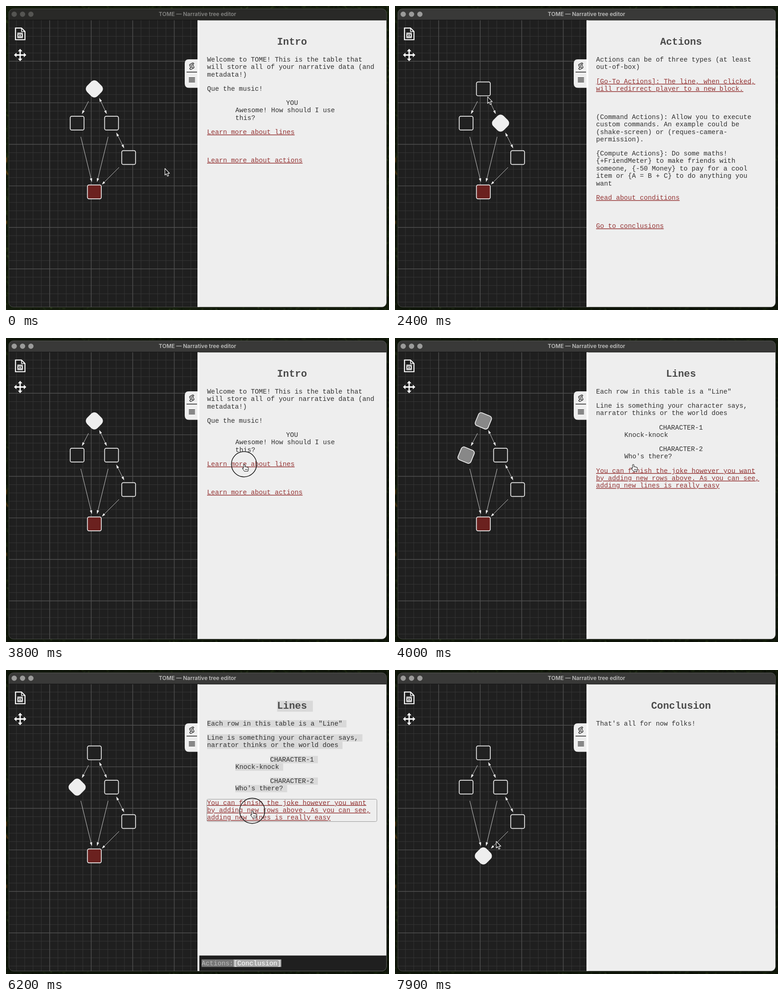
An HTML page that plays this animation: 840 px wide and 667 px high, repeating every 8 s.

```html
<!DOCTYPE html>
<html lang="en">
<head>
<meta charset="utf-8">
<title>Narrative tree editor</title>
<style>
  html, body { margin: 0; width: 100%; height: 100%; overflow: hidden; background: #141c0d; }
  svg { display: block; width: 840px; height: 667px; }
  .mono { font: 14.56px "Liberation Mono", "Courier New", monospace; fill: #303030; white-space: pre; }
  .head { font-size: 21.85px; font-weight: bold; fill: #4a4a4a; text-anchor: middle; }
  .link { fill: #943434; text-decoration: underline; text-decoration-thickness: 1px; text-underline-offset: 1px; }
  .title { font: 600 12px Inter, "Liberation Sans", sans-serif; text-anchor: middle; }
</style>
</head>
<body>
<svg id="stage" viewBox="0 0 840 667" xmlns="http://www.w3.org/2000/svg">
  <defs>
    <clipPath id="frame"><rect x="6" y="6" width="828.5" height="654.5" rx="10"/></clipPath>
    <filter id="soft" filterUnits="userSpaceOnUse" x="0" y="0" width="840" height="667"><feGaussianBlur stdDeviation="1"/></filter>
    <marker id="tip" viewBox="0 0 8 6" refX="7" refY="3" markerWidth="8" markerHeight="6"
      markerUnits="userSpaceOnUse" orient="auto-start-reverse"><path d="M0 0.3 8 3 0 5.7z" fill="#eee"/></marker>
  </defs>
  <rect width="840" height="667" fill="#141c0d"/>
  <g id="grass" fill="none" filter="url(#soft)"></g>
  <rect id="shade" width="840" height="667" fill="#000" opacity="0"/>
  <g clip-path="url(#frame)">
    <rect id="bar" x="6" y="6" width="829" height="25"/>
    <g id="lights"><circle cx="18" cy="18" r="5.8"/><circle cx="36.3" cy="18" r="5.8"/><circle cx="54.6" cy="18" r="5.8"/></g>
    <text id="title" class="title" x="420" y="22">TOME — Narrative tree editor</text>
    <rect x="6" y="31" width="414" height="630" fill="#1f1f1f"/>
    <path id="minor" stroke="#363636"/>
    <path id="major" stroke="#505050" stroke-width="1.4"/>
    <path d="M6 30.8H835" stroke="#111"/>
    <rect x="420" y="31.5" width="415" height="630" fill="#eee"/>
    <rect x="420" y="31.5" width="4" height="630" fill="#fff"/>
    <g fill="none" stroke="#fff" stroke-width="2.2">
      <path d="M20.8 48.3H34L41.600 56V74H20.8z"/>
      <path d="M34 48.5V56H41.5" stroke-width="1.6"/>
      <rect x="25" y="58.5" width="12" height="12" fill="#fff" stroke="none"/>
      <path d="M26.500 60.500H37M26.500 68.700H37" stroke="#1f1f1f" stroke-width="1.300" stroke-dasharray="1.300 1.500"/>
      <path d="M27 64.600H35" stroke="#1f1f1f" stroke-width="4"/>
      <path d="M28.500 64.600H33.500" stroke-width="1.800"/>
    </g>
    <g id="move" transform="translate(31 107.5)" fill="#fff"></g>
    <path d="M420 117H401Q392 117 392 126V170Q392 179.5 401 179.5H420z" fill="#eee"/>
    <path d="M396 145H419" stroke="#222" stroke-width="1.6"/>
    <path d="M401 157.5H414.5M401 160.5H414.5M401 163.5H414.5M401 166.5H414.5" stroke="#222" stroke-width="1.3"/>
    <g transform="translate(407.500 132) rotate(-28)" fill="none" stroke="#222" stroke-width="1.200" stroke-linejoin="round" stroke-linecap="round">
      <path d="M-3.500 2V-3.500Q-3.500-5.500-1.500-5.500H5Q6.500-5.500 6.500-3.500V-2.500H3.500V3.500Q3.500 5.500 1.500 5.500H-5Q-6.500 5.500-6.500 3.500V2H0V3.500Q0 5.500 1.500 5.500"/>
      <path d="M3.500-2.500V-4M-1.500-2.800H1.500M-1.500-.300H1.500"/>
    </g>
    <g id="edges" stroke="#ddd" stroke-width=".9"></g>
    <g id="nodes" stroke="#eee" stroke-width="1.7"></g>
    <g id="page"></g>
  </g>
  <rect x="6.2" y="6.2" width="828.3" height="654.3" rx="10" fill="none" stroke="#777" stroke-width=".7" opacity=".75"/>
  <g id="ring" fill="none"><circle r="28.7" stroke="#fff" stroke-opacity=".25"/><circle r="27.7" stroke="#111" stroke-width="1.5"/></g>
  <path id="arrow" d="M0 0V14.5L3.3 11.5 5.7 17 8.2 15.9 5.9 10.6H10.3z" fill="#151515" stroke="#fff" stroke-width="1.1" stroke-linejoin="round"/>
  <g id="hand" fill="#fff" stroke="#222" stroke-width="1.1" stroke-linejoin="round">
    <path d="M-1 9V1.5Q.5-1 2 1.5V6Q3.500 4.300 4.700 6.200 6.200 5 7.200 6.900 9.200 6 9.700 8.500V11.500L8.300 15.500H1.200L-3.500 9.500Q-3.500 7-1 9z"/>
    <path d="M3 10V13M5 10V13M7 10V13" stroke-width=".9"/>
  </g>
</svg>
<script>
const LOOP = 8000, STEP = 100, CHAR = 8.736, LEFT = 441, MID = 627.3;
const $ = id => document.getElementById(id);
const show = (id, on) => $(id).style.display = on ? '' : 'none';
const clamp = v => Math.max(0, Math.min(1, v));
const ease = v => v * v * (3 - 2 * v);

// Row: [centre y, text, kind]; kinds are a = link, c = character, d = dialogue.
const pages = {
  Intro: [
    [118, 'Welcome to TOME! This is the table that'],
    [134.4, 'will store all of your narrative data (and'],
    [150.8, 'metadata!)'],
    [182, 'Que the music!'],
    [213, 'YOU', 'c'],
    [229.4, 'Awesome! How should I use', 'd'],
    [245.8, 'this?', 'd'],
    [277, 'Learn more about lines', 'a'],
    [339, 'Learn more about actions', 'a']
  ],
  Actions: [
    [118, 'Actions can be of three types (at least'],
    [134.4, 'out-of-box)'],
    [165.7, '[Go-To Actions]: The line, when clicked,', 'a'],
    [182, 'will redirrect player to a new block.', 'a'],
    [244, '(Command Actions): Allow you to execute'],
    [260.4, 'custom commands. An example could be'],
    [276.8, '(shake-screen) or (reques-camera-'],
    [293, 'permission).'],
    [324, '{Compute Actions}: Do some maths!'],
    [340.4, '{+FriendMeter} to make friends with'],
    [356.8, 'someone, {-50 Money} to pay for a cool'],
    [373.2, 'item or {A = B + C} to do anything you'],
    [389.6, 'want'],
    [421, 'Read about conditions', 'a'],
    [483, 'Go to conclusions', 'a']
  ],
  Lines: [
    [118, 'Each row in this table is a "Line"'],
    [149, 'Line is something your character says,'],
    [165.4, 'narrator thinks or the world does'],
    [196.5, 'CHARACTER-1', 'c'],
    [213, 'Knock-knock', 'd'],
    [243.8, 'CHARACTER-2', 'c'],
    [260.2, 'Who\'s there?', 'd'],
    [291.5, 'You can finish the joke however you want', 'a'],
    [308, 'by adding new rows above. As you can see,', 'a'],
    [324.4, 'adding new lines is really easy', 'a']
  ],
  Conclusion: [[118, 'That\'s all for now folks!']]
};

const nodes = [[193.8, 181.800], [156, 257], [231.5, 257], [269, 332.5], [193.8, 407.900]];
const edges = [
  'M181 209 167 236', 'M205 203 220.5 236', 'M242.5 279 258.5 311',
  'M164 287 188 385', 'M224 287 200 385', 'M248 354 211 391'
];
const twoWay = [1, 2];

// Visits: [time, node index, page]
const visits = [[0, 0, 'Intro'], [1800, 2, 'Actions'], [2800, 0, 'Intro'], [4000, 1, 'Lines'], [6300, 4, 'Conclusion']];
// Cursor moves: [start, end, x, y]
const moves = [
  [0, 900, 230, 259], [1900, 2600, 196.5, 184.5], [2900, 3700, 522, 277], [4100, 4900, 532, 304.5],
  [4900, 5300, 538, 308], [5400, 5600, 540, 309], [6700, 7200, 537.5, 279], [7400, 7900, 222, 376]
];
const clicks = [[1000, 1100], [1500, 1800], [2700, 2800], [3800, 4000], [6200, 6300]];
const within = (t, spans) => spans.some(([a, b]) => t >= a && t < b);

const rect = (x, y, w, h, attrs) => `<rect x="${x}" y="${y}" width="${w}" height="${h}" ${attrs}/>`;
const mono = (x, y, text, cls = '', attrs = '') => `<text class="mono ${cls}" x="${x}" y="${y}" ${attrs}>${text}</text>`;

function rowMarkup([y, text, kind], selected) {
  const x = kind === 'c' ? MID - text.length * CHAR / 2 : kind === 'd' ? 503 : LEFT;
  const mark = selected && kind !== 'a' ? rect(x, y - 8, (text.length + 1) * CHAR, 16, 'fill="#d9d9d9"') : '';
  return mark + mono(x, y + 4, text, kind === 'a' ? 'link' : '');
}

function focusMarkup(y, h, target, selected) {
  const split = 429 + 8 * CHAR;
  const back = selected ? rect(429, 635, 8 * CHAR, 16.5, 'fill="#777"')
    + rect(split, 635, (target.length + 2) * CHAR, 16.5, 'fill="#aaa"') : '';
  return rect(440.5, y, 373, h, 'rx="3" fill="none" stroke="#999"')
    + rect(424, 626.5, 411, 35, 'fill="#1f1f1f"') + back
    + mono(429, 647.5, 'Actions:', '', 'style="fill:#bbb"')
    + mono(split, 647.5, `[${target}]`, '', 'style="fill:#fff"');
}

function pageMarkup(name, state) {
  const selected = state === 'selected';
  let out = selected ? rect(594.5, 67.5, 78.5, 24, 'fill="#d9d9d9"') : '';
  out += mono(MID, 85.2, name, 'head') + pages[name].map(r => rowMarkup(r, selected)).join('');
  if (selected) out += focusMarkup(283.5, 49, 'Conclusion', true);
  if (state === 'focused') out += focusMarkup(268.5, 17, 'Lines', false);
  return out;
}

function buildStatic() {
  let seed = 7;
  const rnd = () => (seed = seed * 16807 % 2147483647) / 2147483647;
  const colors = ['#1d2b10', '#0c1208', '#263617', '#18220d', '#2b3a1a'];
  let grass = '';
  for (let i = 0; i < 320; i++) {
    const along = rnd(), side = i % 4;
    const x = side < 2 ? along * 840 : side === 2 ? 2 : 838;
    const y = side === 0 ? 2 : side === 1 ? 664 : along * 667;
    grass += `<path d="M${x} ${y}l${rnd() * 14 - 7} ${rnd() * 16 - 8}" stroke="${colors[i % 5]}" stroke-width="${1 + rnd() * 2}"/>`;
  }
  grass += '<path d="M1 333V343M0 362 4 370M1 471V478" stroke="#8a5a1c" stroke-width="2"/>';
  $('grass').innerHTML = grass;

  const lines = { minor: '', major: '' };
  const unit = 18.22;
  for (let i = -4; i < 18; i++) lines[i % 5 ? 'minor' : 'major'] += `M${95.7 + i * unit} 31V661`;
  for (let i = -4; i < 30; i++) lines[i % 5 ? 'minor' : 'major'] += `M6 ${121.3 + i * unit}H420`;
  for (const id in lines) $(id).setAttribute('d', lines[id]);

  $('move').innerHTML = [0, 90, 180, 270].map(a =>
    `<path transform="rotate(${a})" d="M0-13.5 5-8H1.4V0H-1.4V-8H-5z"/>`).join('');
  $('edges').innerHTML = edges.map((d, i) =>
    `<path d="${d}" marker-end="url(#tip)" ${twoWay.includes(i) ? 'marker-start="url(#tip)"' : ''}/>`).join('');
  $('nodes').innerHTML = nodes.map(([x, y]) =>
    `<g transform="translate(${x} ${y})">${rect(-15.2, -15.2, 30.4, 30.4, '')}</g>`).join('');
}

const mix = (a, b, p) => `rgb(${a.map((v, i) => Math.round(v + (b[i] - v) * p))})`;

function drawNodes(t) {
  const now = visits.findLastIndex(v => t >= v[0]);
  const p = now ? clamp((t - visits[now][0] + STEP) / 200) : 1;
  [...$('nodes').children].forEach((group, i) => {
    const on = i === visits[now][1] ? p : now && i === visits[now - 1][1] ? 1 - p : 0;
    const box = group.firstChild;
    box.setAttribute('transform', `rotate(${45 * on})`);
    box.setAttribute('rx', 3.5 + 5 * on);
    box.setAttribute('fill', mix(i === 4 ? [107, 33, 31] : [33, 33, 33], [238, 238, 238], on));
  });
  return visits[now][2];
}

function cursorAt(t) {
  let x = 348.5, y = 356.5;
  for (const [a, b, tx, ty] of moves) {
    const p = ease(clamp((t - a) / (b - a)));
    x += (tx - x) * p;
    y += (ty - y) * p;
  }
  return [x, y];
}

let shownPage = '';
function render(t) {
  const active = t >= 1100;
  $('bar').setAttribute('fill', active ? '#393938' : '#292927');
  $('lights').setAttribute('fill', active ? '#9b9b9a' : '#555552');
  $('title').setAttribute('fill', active ? '#bdbdbc' : '#858583');
  $('shade').setAttribute('opacity', active ? .25 : 0);

  const name = drawNodes(t);
  const state = within(t, [[3900, 4000]]) ? 'focused' : within(t, [[6200, 6300]]) ? 'selected' : '';
  if (shownPage !== name + state) {
    shownPage = name + state;
    $('page').innerHTML = pageMarkup(name, state);
  }

  const at = `translate(${cursorAt(t)})`;
  const pointing = within(t, [[3600, 4100], [4500, 6800]]);
  for (const id of ['ring', 'arrow', 'hand']) $(id).setAttribute('transform', at);
  show('ring', within(t, clicks));
  show('hand', pointing);
  show('arrow', !pointing);
}

buildStatic();
const start = performance.now();
function tick() {
  const t = (performance.now() - start) % LOOP;
  render(Math.floor(t / STEP) * STEP);
  requestAnimationFrame(tick);
}
tick();
</script>
</body>
</html>
```
